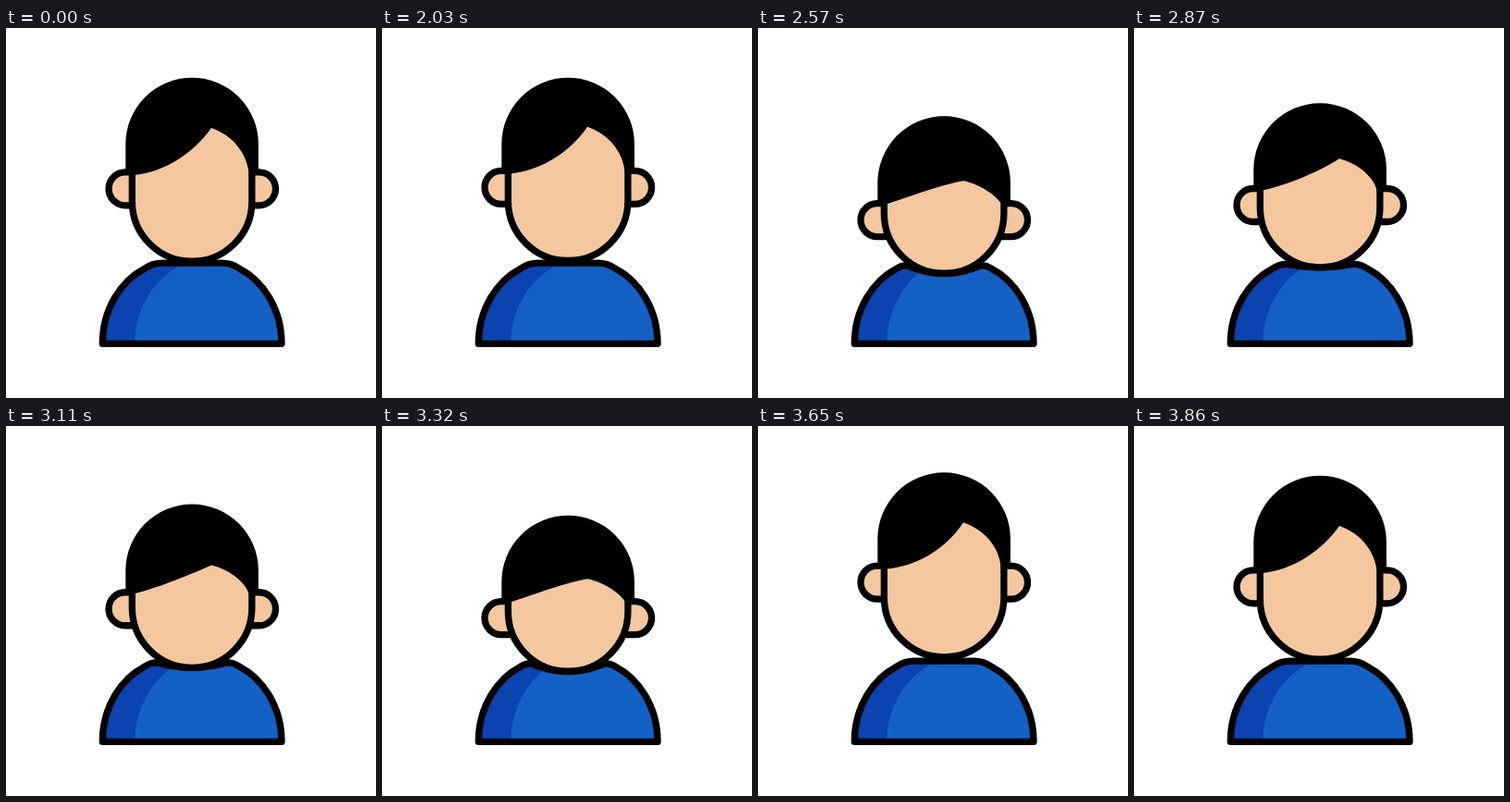
These frames come from a looping animation (400x400 px, 4.1 s). An HTML page with a canvas:

```html
<!DOCTYPE html>
<html>
<head>
<meta charset="utf-8">
<title>Nodding avatar</title>
<style>
html, body { margin: 0; width: 100%; height: 100%; overflow: hidden; background: #fff; }
canvas { display: block; }
</style>
</head>
<body>
<canvas id="stage" width="400" height="400"></canvas>
<script>
const ctx = document.getElementById('stage').getContext('2d');
const LOOP = 4100, STEP = 30, LEAD = 24;
const KEYS = [2030, 2250, 2610, 2965, 3330, 3640, 3860];
const MID = 201.1, FACE_R = 64.75, HAIR_R = 71.8;

const mix = (a, b, k) => a + (b - a) * k;
const easeOut = k => 1 - (1 - k) ** 3;
const easeInOut = k => (1 - Math.cos(Math.PI * k)) / 2;

// Lift, dip, half rise, dip, lift, rest.
function nod(t, lift, dip, half) {
  const values = [0, lift, dip, half, dip, lift, 0];
  if (t <= KEYS[0] || t >= KEYS[6]) return 0;
  const i = KEYS.findIndex(key => key > t) - 1;
  const k = (t - KEYS[i]) / (KEYS[i + 1] - KEYS[i]);
  return mix(values[i], values[i + 1], i ? easeInOut(k) : easeOut(k));
}

function paint(d, fill, stroke = true) {
  const path = new Path2D(d);
  ctx.fillStyle = fill;
  ctx.fill(path);
  if (stroke) ctx.stroke(path);
  return path;
}

function drawBody(k) {
  const side = 168 - 6 * k, sideY = 254.2 + 3 * k;
  const bend = 159 - 3 * k, bendY = 254.2 + 1.5 * k;
  const flip = x => 2 * MID - x;
  const body = paint(`M104.3 341.3C104.3 303 125 273 150 260Q${bend} ${bendY} ${side} ${sideY}
    Q${MID} ${254.2 + 20 * k} ${flip(side)} ${sideY}Q${flip(bend)} ${bendY} ${flip(150)} 260
    C${flip(125)} 273 298 303 298 341.3Z`, '#1461c5', false);
  ctx.save();
  ctx.clip(body);
  paint(`M100 345H139C139 303 160 270 ${192 - 4 * k} 255V240H100Z`, '#0b43b0', false);
  ctx.restore();
  ctx.stroke(body);
}

function drawHead(top, ear, tip, chin) {
  const skin = '#f4c79e';
  const crown = 125.5 + top, earY = 173.8 + ear, jaw = 187.5 + chin;
  const faceL = MID - FACE_R, faceR = MID + FACE_R;
  const k = tip / 57.5;

  paint(`M148 ${earY - 18}H129A18 18 0 0 0 129 ${earY + 18}H148`, skin);
  paint(`M254 ${earY - 18}H273.5A18 18 0 0 1 273.5 ${earY + 18}H254`, skin);
  paint(`M${faceL} ${crown}A${FACE_R} ${FACE_R} 0 0 1 ${faceR} ${crown}V${jaw}
    A${FACE_R} ${FACE_R} 0 0 1 ${faceL} ${jaw}Z`, skin);

  const tipY = 108 + tip, left = 159 + ear * 0.94, right = 163 + ear * 0.8;
  paint(`M${MID - HAIR_R} ${earY - 15}V${crown}
    A${HAIR_R} ${HAIR_R} 0 0 1 ${MID + HAIR_R} ${crown}V${earY - 15}
    H266V${right}H263C${mix(263, 258, k)} ${right - mix(25, 8, k)}
    ${mix(246, 242, k)} ${tipY + mix(8, 4, k)} 222 ${tipY}
    C${mix(204, 200, k)} ${tipY + mix(26, 3.5, k)}
    ${mix(172, 165, k)} ${left - mix(3, 9, k)} 138 ${left}H135Z`, '#000', false);
}

function draw(t) {
  const early = t + LEAD;
  const chin = nod(early, -2.5, 13, 6);
  ctx.clearRect(0, 0, 400, 400);
  ctx.lineWidth = 7.3;
  ctx.lineJoin = 'round';
  drawBody(Math.max(0, (chin - 2.5) / 10.5));
  drawHead(nod(t, -3.5, 43, 24.5), nod(early, -5, 34, 16), nod(early, -4, 57.5, 30.6), chin);
}

const start = performance.now();
function frame() {
  const t = (performance.now() - start) % LOOP;
  draw(Math.floor((t - 20) / STEP) * STEP + 20);
  requestAnimationFrame(frame);
}
frame();
</script>
</body>
</html>
```
